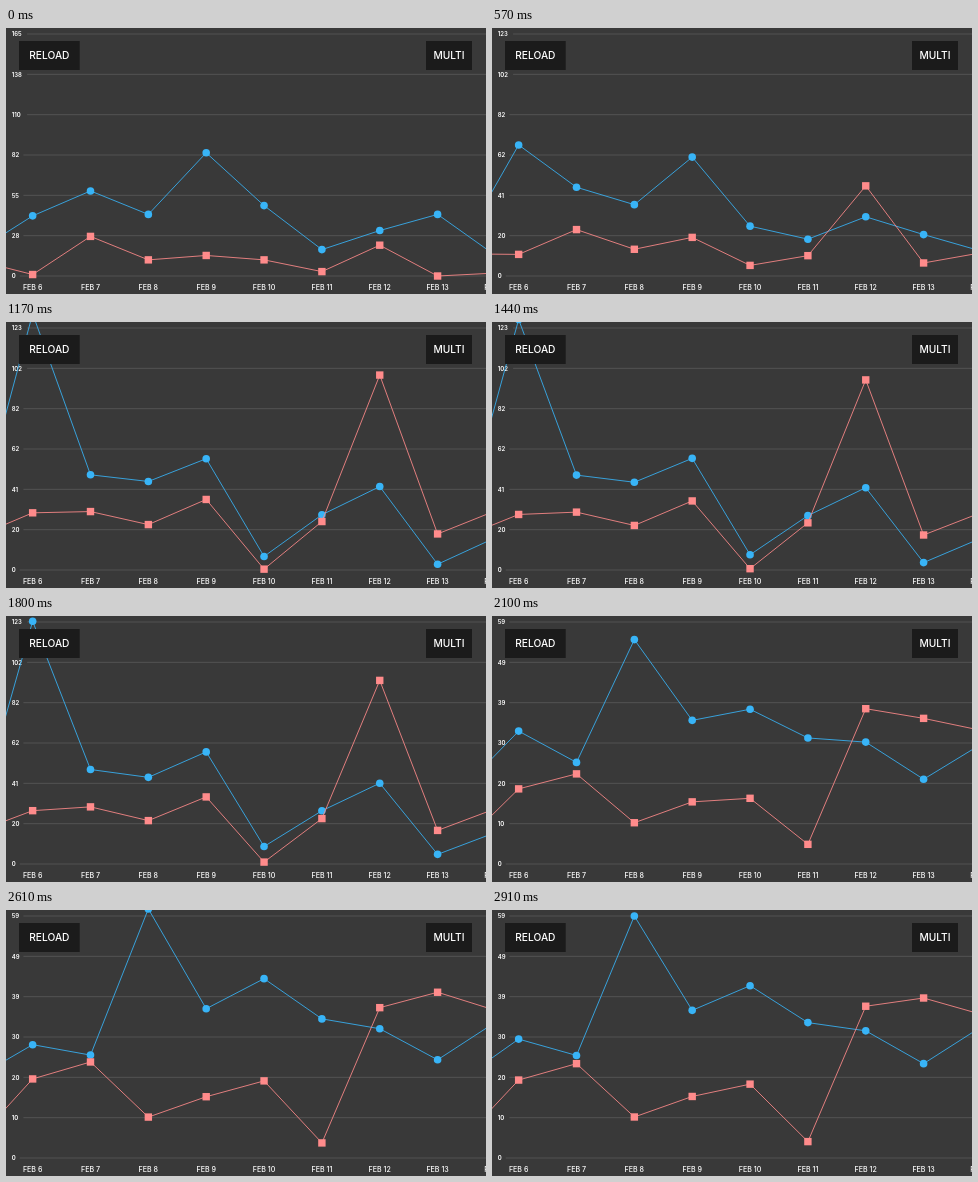
Write an HTML page with a canvas that moves like this. It is 480 by 266 pixels and loops after 2.94 s.

```html
<!DOCTYPE html>
<html lang="en">
<head>
<meta charset="utf-8">
<title>Elastic line chart</title>
<style>
  html, body { margin: 0; width: 480px; height: 266px; overflow: hidden; background: #393939; }
  canvas { display: block; }
</style>
</head>
<body>
<canvas id="chart" width="480" height="266"></canvas>
<script>
const ctx = document.getElementById('chart').getContext('2d');
const LOOP = 2940, TOP = 6, BASELINE = 248, ROWS = 6, FIRST_DAY = 5;
const BACKGROUND = '#393939', GRID = '#535353', BUTTON = '#1b1b1b', BLUE = '#38b4f7', PINK = '#ff8b8b';

// Daily readings from FEB 5 on; each set springs in from the one before.
const sets = [
  {
    start: 0, max: 165,
    blue: [16, 41, 58, 42, 84, 48, 18, 31, 42, 14],
    pink: [11, 1, 27, 11, 14, 11, 3, 21, 0, 2]
  },
  {
    start: 440, max: 123, decay: 3.05, freq: 3.27,
    blue: [20, 123, 48, 44, 57, 9, 27, 41, 5, 16],
    pink: [16, 27, 29, 22, 34, 1, 23, 93, 17, 28]
  },
  {
    start: 1815, max: 59, decay: 3.83, freq: 4.284,
    blue: [19, 29, 25, 59, 36, 42, 33, 31, 23, 32],
    pink: [4, 19, 23, 10, 15, 18, 4, 37, 39, 35]
  }
];

const dayX = i => -31.2 + 57.85 * i;
const scaleY = fraction => BASELINE - fraction * (BASELINE - TOP);
const mix = (a, b, t) => a + (b - a) * t;
const spring = (seconds, { decay, freq }) => 1 - Math.exp(-decay * seconds) * Math.cos(freq * seconds);
const roundHalfEven = v => v % 1 === 0.5 ? 2 * Math.round(v / 2) : Math.round(v);

function text(str, x, y, font, align = 'center') {
  ctx.font = font + ' Inter, sans-serif';
  ctx.textAlign = align;
  ctx.fillStyle = '#fff';
  ctx.fillText(str, x, y);
}

function drawAxes(max) {
  for (let row = 0; row <= ROWS; row++) {
    const y = scaleY(row / ROWS);
    const label = String(roundHalfEven(max * row / ROWS));
    const left = 10 + 3.7 * label.length;
    ctx.fillStyle = GRID;
    ctx.fillRect(left, y - 0.5, 480 - left, 1);
    text(label, 5.7, y + 2.2, '600 6px', 'left');
  }
  for (let i = 1; i < 10; i++) text('FEB ' + (FIRST_DAY + i), dayX(i), 262.2, '500 7.1px');
}

function drawSeries(heights, color, drawMarker) {
  ctx.strokeStyle = ctx.fillStyle = color;
  ctx.lineWidth = 0.85;
  ctx.beginPath();
  heights.forEach((y, i) => ctx.lineTo(dayX(i), y));
  ctx.stroke();
  heights.forEach((y, i) => drawMarker(dayX(i), y));
}

function dot(x, y) {
  ctx.beginPath();
  ctx.arc(x, y, 3.8, 0, 2 * Math.PI);
  ctx.fill();
}

const square = (x, y) => ctx.fillRect(x - 3.7, y - 3.7, 7.4, 7.4);

function drawButton(label, x, width) {
  ctx.fillStyle = BUTTON;
  ctx.fillRect(x, 13, width, 29);
  text(label, x + width / 2, 31.2, '500 10.2px');
}

function draw(time) {
  const index = sets.findLastIndex(set => time >= set.start);
  const set = sets[index], previous = sets[index - 1] || set;
  const progress = index ? spring((time - set.start) / 1000, set) : 1;
  const heights = key => set[key].map((value, i) =>
    mix(scaleY(previous[key][i] / previous.max), scaleY(value / set.max), progress));

  ctx.fillStyle = BACKGROUND;
  ctx.fillRect(0, 0, 480, 266);
  drawAxes(set.max);
  drawSeries(heights('blue'), BLUE, dot);
  drawSeries(heights('pink'), PINK, square);
  drawButton('RELOAD', 13, 60.7);
  drawButton('MULTI', 420, 46);
}

const origin = performance.now();
function tick() {
  draw((performance.now() - origin) % LOOP);
  requestAnimationFrame(tick);
}
tick();
</script>
</body>
</html>
```
